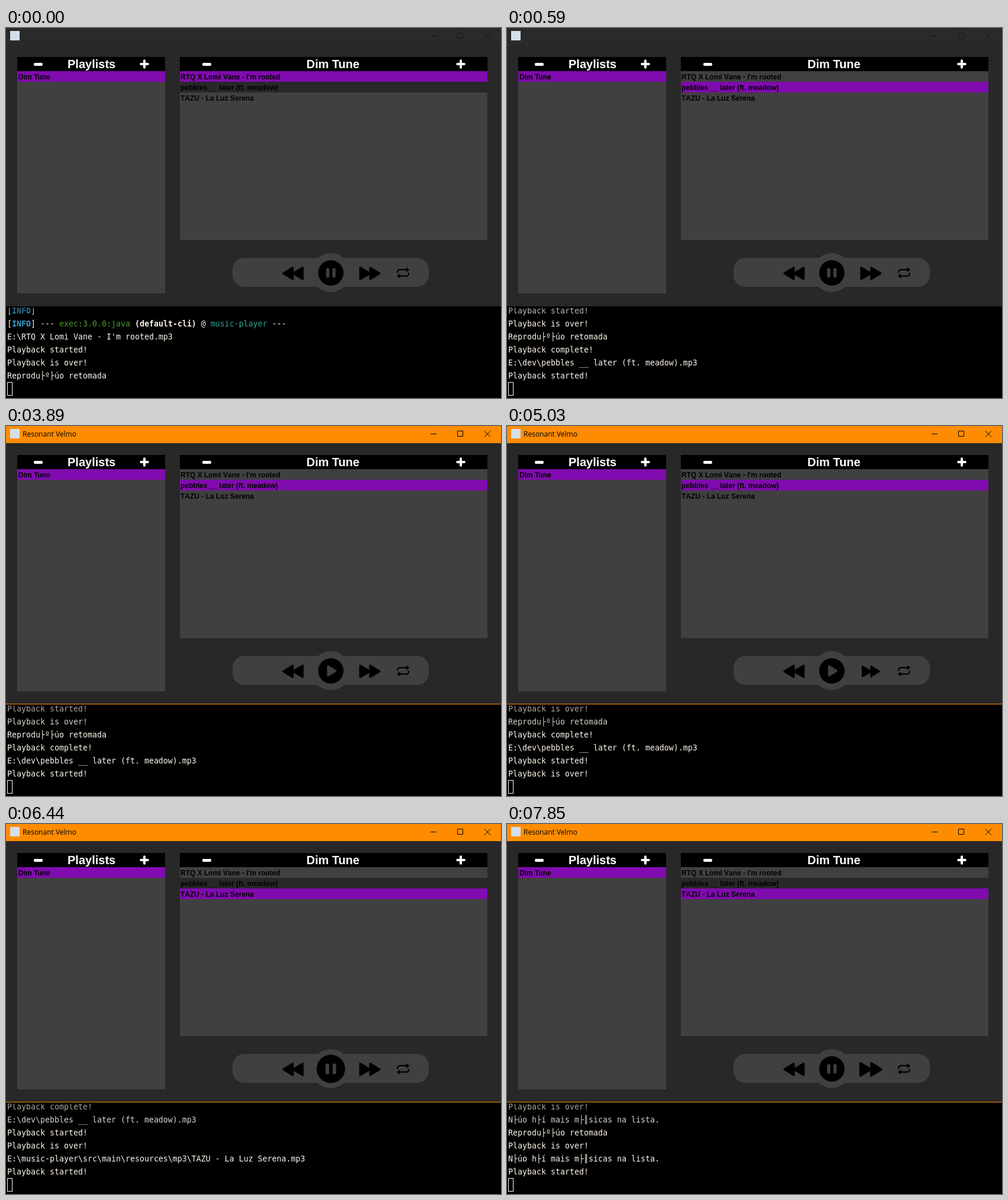
An HTML page that plays this animation: 837 by 626 pixels, repeating every 8000 ms.

```html
<!DOCTYPE html>
<html lang="en">
<head>
<meta charset="utf-8">
<title>Music player</title>
<style>
  html, body { margin: 0; width: 100%; height: 100%; overflow: hidden; background: #000; }
  svg { display: block; }
  text { font-kerning: none; }
  .head { font: bold 20px "Liberation Sans", Arial, sans-serif; fill: #fff; }
  .row { font: bold 12px "Liberation Sans", Arial, sans-serif; }
  .title { font: 12px "Open Sans", "Noto Sans", sans-serif; }
  #log text { font: 13.29px "DejaVu Sans Mono", "Noto Sans Mono", monospace; fill: #fff6ea; white-space: pre; }
  #log .info { fill: #3a9fcb; font-weight: bold; }
  #log .goal { fill: #4b9a2c; }
  #log .project { fill: #2ba596; }
  #log .bold { font-weight: bold; }
  .panel { fill: #404040; }
  .pick { fill: #800bae; }
</style>
</head>
<body>
<svg width="837" height="626" viewBox="0 0 837 626">
  <defs>
    <clipPath id="logArea"><rect y="473" width="837" height="153"/></clipPath>
    <linearGradient id="shade" x2="0" y2="1">
      <stop offset="0" stop-opacity=".4"/>
      <stop offset="1" stop-opacity="0"/>
    </linearGradient>
    <g id="minus"><rect x="-7.5" y="-2" width="15" height="5" rx="2" fill="#fff"/></g>
    <path id="plus" d="M-5.8 0H5.8M0-5.8V5.8" stroke="#fff" stroke-width="4" stroke-linecap="round"/>
    <path id="skip" d="M-16.4-9.8V9.8L0 0ZM.4-9.8V9.8L16.4 0Z"
      stroke="#000" stroke-width="3.2" stroke-linejoin="round"/>
    <g id="arrow">
      <path d="M-9.3-.8V-1.9A3.5 3.5 0 0 1-5.8-5.4H6" fill="none" stroke="#000" stroke-width="2.2" stroke-linecap="round"/>
      <path d="M5.5-8.6L10.2-5.4L5.5-2Z" stroke="#000" stroke-linejoin="round"/>
    </g>
  </defs>

  <rect width="837" height="626"/>
  <g id="log" clip-path="url(#logArea)"></g>
  <rect id="shadow" y="471" width="837" fill="url(#shade)"/>
  <rect x="2.5" y="599.5" width="8" height="22" fill="none" stroke="#fff"/>

  <rect width="837" height="471" fill="#282828"/>
  <rect id="bar" width="837" height="29"/>
  <rect id="edge" y="470" width="837" height="1" fill="#ff8c00"/>
  <rect x="7" y="5" width="16" height="16" fill="#d3dfe9"/>
  <text id="caption" class="title" x="28" y="18">Resonant Velmo</text>
  <path id="buttons" d="M718 13.5H728M763.5 8.5H772.5V17.5H763.5ZM809 8.5L819 18.5M819 8.5L809 18.5" fill="none"/>

  <rect x="19" y="49" width="250" height="24"/>
  <rect class="panel" x="19" y="73" width="250" height="376"/>
  <rect class="pick" x="19" y="73" width="250" height="18"/>
  <text class="head" x="104" y="68">Playlists</text>
  <text class="row" x="21" y="87">Dim Tune</text>
  <use href="#minus" x="54.5" y="61"/>
  <use href="#plus" x="234" y="61"/>

  <rect x="294" y="49" width="520" height="24"/>
  <rect class="panel" x="294" y="73" width="520" height="286"/>
  <rect x="294" y="91" width="520" height="18" fill="#282828"/>
  <rect id="pick" class="pick" x="294" width="520" height="18"/>
  <text class="head" x="508" y="68">Dim Tune</text>
  <g id="songs" class="row"></g>
  <use href="#minus" x="339.5" y="61"/>
  <use href="#plus" x="769" y="61"/>

  <rect class="panel" x="383" y="389" width="332" height="49" rx="20"/>
  <circle class="panel" cx="549.2" cy="413.8" r="33"/>
  <use id="back" href="#skip"/>
  <use id="next" href="#skip"/>
  <g id="main">
    <circle r="21.5"/>
    <g id="pause" class="panel">
      <rect x="-8" y="-8.1" width="5.4" height="16.2" rx="2.4"/>
      <rect x="2.6" y="-8.1" width="5.4" height="16.2" rx="2.4"/>
    </g>
    <path id="play" class="panel" d="M-4.6-7.4V7.4L7.6 0Z" stroke="#404040" stroke-width="3.6" stroke-linejoin="round"/>
  </g>
  <g transform="translate(671.5 414.3)">
    <use href="#arrow"/>
    <use href="#arrow" transform="rotate(180)"/>
  </g>
</svg>

<script>
const LOOP = 8000;
const HOVER = 1.085, PRESS = 0.86, BIG = 1.116;
const $ = id => document.getElementById(id);
const show = (id, on) => $(id).setAttribute('visibility', on ? 'visible' : 'hidden');
const place = (id, x, y, sx, sy = sx) =>
  $(id).setAttribute('transform', `translate(${x} ${y}) scale(${sx} ${sy})`);

const songs = ["RTQ X Lomi Vane - I'm rooted", 'pebbles __ later (ft. meadow)', 'TAZU - La Luz Serena'];
const info = '[<tspan class="info">INFO</tspan>]';
const started = 'Playback started!', over = 'Playback is over!';
const resumed = 'Reprodu├º├úo retomada', noMore = 'N├úo h├í mais m├║sicas na lista.';
const lines = [
  info,
  info + ' --- <tspan class="goal">exec:3.0.0:java</tspan> <tspan class="bold">(default-cli)</tspan>' +
    ' @ <tspan class="project">music-player</tspan> ---',
  `E:\\${songs[0]}.mp3`, started, over, resumed,
  'Playback complete!', `E:\\dev\\${songs[1]}.mp3`, started,
  over,
  `E:\\music-player\\src\\main\\resources\\mp3\\${songs[2]}.mp3`, started,
  over, noMore, resumed,
  over, noMore, started
];

// Each step changes part of the state; top is the first visible log line.
const steps = [
  [0, { top: 0, song: 0, active: false, playing: true, main: 1, back: 1, next: 1 }],
  [500, { top: 1, song: 1 }],
  [560, { top: 2 }],
  [590, { top: 3 }],
  [3230, { main: BIG }],
  [3710, { active: true }],
  [3890, { playing: false, main: 1 }],
  [3920, { top: 4 }],
  [4790, { next: HOVER }],
  [5030, { next: PRESS }],
  [5180, { next: HOVER, playing: true, song: 2, top: 6 }],
  [5840, { next: 1 }],
  [5900, { main: BIG }],
  [5960, { main: 1 }],
  [6020, { back: HOVER }],
  [6440, { back: 1, main: BIG }],
  [6500, { main: 1, next: HOVER }],
  [6770, { next: PRESS }],
  [6980, { next: HOVER, top: 7 }],
  [7010, { top: 8 }],
  [7040, { top: 9 }],
  [7610, { next: PRESS }],
  [7820, { next: HOVER, top: 11 }],
  [7850, { top: 12 }]
];

$('songs').innerHTML = songs.map((s, i) => `<text x="295" y="${87 + i * 18}">${s}</text>`).join('');

function draw(s) {
  $('log').innerHTML = lines.slice(s.top, s.top + 6)
    .map((text, i) => `<text x="2" y="${483 + i * 22}">${text}</text>`).join('');
  $('shadow').setAttribute('height', s.active ? 48 : 24);
  $('bar').setAttribute('fill', s.active ? '#ff8c00' : '#2a2a2a');
  $('buttons').setAttribute('stroke', s.active ? '#000' : '#161616');
  show('caption', s.active);
  show('edge', s.active);
  $('pick').setAttribute('y', 73 + s.song * 18);
  show('pause', s.playing);
  show('play', !s.playing);
  place('main', 549.3, 414.3, s.main);
  place('back', 485.3, 415.2, -s.back, s.back);
  place('next', 615.3, 415.2, s.next);
}

const start = performance.now();
let shown = -1;
function tick() {
  const t = (performance.now() - start) % LOOP;
  const count = steps.filter(([at]) => at <= t).length;
  if (count !== shown) {
    draw(Object.assign({}, ...steps.slice(0, count).map(step => step[1])));
    shown = count;
  }
  requestAnimationFrame(tick);
}
tick();
</script>
</body>
</html>
```
